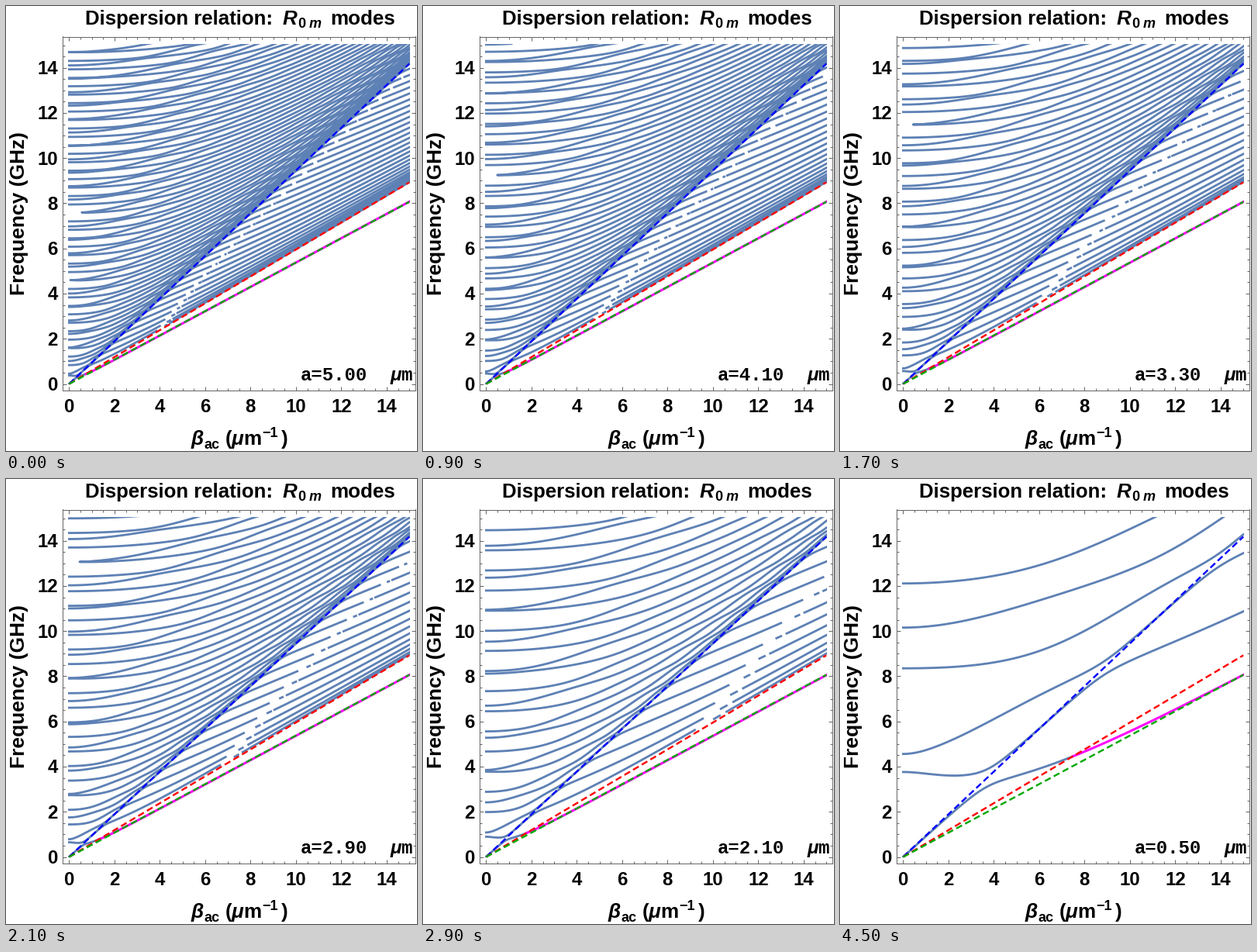
Animation, 530 px wide and 574 px high, one loop 4600 ms. Source, as a matplotlib script:

```python
import numpy as np
import matplotlib.pyplot as plt
from matplotlib.animation import FuncAnimation
from matplotlib.patches import Rectangle

W, H, DPI = 530, 574, 100
VL, VS, VR = 5.94, 3.74, 3.378      # bulk and surface wave speeds, km/s
TAU = 2 * np.pi
STEPS = 46
PX = 72 / DPI                       # points per pixel
LEFT, RIGHT, TOP, BOTTOM = 72.5, 528, 39.5, 495.5
X0, Y0, SX, SY = 81.4, 487.5, 29.25, 29.13   # origin and scale in pixels

# Bessel functions from their integral forms, tabulated once
theta = (np.arange(400) + 0.5) * np.pi / 400
xs = np.linspace(0, 135, 8101)
phase = np.outer(xs, np.sin(theta))
J0 = np.cos(phase).mean(axis=1)
J1 = np.cos(theta - phase).mean(axis=1)
decay = np.exp(np.outer(xs, np.cos(theta) - 1))
I_RATIO = (decay * np.cos(theta)).mean(axis=1) / decay.mean(axis=1)
del phase, decay


def j0(x):
    return np.interp(x, xs, J0)


def j1(x):
    return np.interp(x, xs, J1)


def i_ratio(x):
    return np.interp(x, xs, I_RATIO)


def pochhammer(k, f, a):
    """Axisymmetric rod equation, scaled so evanescent terms stay finite."""
    p2 = (TAU * f / VL) ** 2 - k ** 2
    q2 = (TAU * f / VS) ** 2 - k ** 2
    p, q = np.sqrt(np.abs(p2)), np.sqrt(np.abs(q2)) + 1e-9
    real_p, real_q = p2 > 0, q2 > 0
    a0 = np.where(real_p, j0(p * a), 1)
    a1 = np.where(real_p, p * j1(p * a), -p * i_ratio(p * a))
    b0 = np.where(real_q, j0(q * a), 1)
    b1 = np.where(real_q, j1(q * a), i_ratio(q * a)) / q
    value = (2 / a * (q2 + k ** 2) * a1 * b1
             - (q2 - k ** 2) ** 2 * a0 * b1 - 4 * k ** 2 * a1 * b0)
    return value, np.where(real_p, 0, p * a)


# Bulk grid follows the shear branches; surface grid lies below the shear line
K, Y = np.meshgrid(np.linspace(0, 15, 301), np.linspace(1e-3, 15.05, 600))
F = np.hypot(Y, VS * K / TAU)
KS, RATIO = np.meshgrid(np.linspace(0.03, 15, 200), np.linspace(0.85, 1, 80))
FS = RATIO * VS * KS / TAU

fig = plt.figure(figsize=(W / DPI, H / DPI), dpi=DPI, facecolor="white")
ax = fig.add_axes([LEFT / W, 1 - BOTTOM / H,
                   (RIGHT - LEFT) / W, (BOTTOM - TOP) / H])
ax.set_xlim((LEFT - X0) / SX, (RIGHT - X0) / SX)
ax.set_ylim((Y0 - BOTTOM) / SY, (Y0 - TOP) / SY)
ax.set_xticks(range(0, 15, 2))
ax.set_yticks(range(0, 15, 2))
ax.set_xticks(np.arange(0, 15.1, 0.5), minor=True)
ax.set_yticks(np.arange(0, 15.1, 0.5), minor=True)
for which, size in (("major", 5), ("minor", 3)):
    ax.tick_params(which=which, direction="in", length=size * PX,
                   width=PX, color="#666666", top=True, right=True,
                   labelbottom=False, labelleft=False)
for spine in ax.spines.values():
    spine.set(color="#666666", linewidth=PX)


def put(x, y, text, size=26, family="Liberation Sans", **kw):
    kw.setdefault("va", "baseline")
    return fig.text(x / W, 1 - y / H, text, fontsize=size * PX,
                    family=family, weight="bold", color="black", **kw)


put(101.5, 24, "Dispersion relation:", 25.8)
put(356.5, 24, "R", style="italic")
put(376, 28, "0", 18)
put(390.5, 28, "m", 18, style="italic")
put(418, 24, "modes")

for n in range(0, 15, 2):
    put(X0 + SX * n, 524, str(n), 24, ha="center")
    put(67, 496 - SY * n, str(n), 24, ha="right")
put(29, 268, "Frequency (GHz)", 26.4, rotation=90, ha="right", va="center")

put(239, 566, "β", style="italic")
put(256, 571, "ac", 18)
put(283, 566, "(")
put(291, 566, "μ", style="italic")
put(306, 566, "m")
put(330, 556, "−1", 18)
put(355, 566, ")")

MONO = "Liberation Mono"
radius = put(379.5, 483, "", 24, MONO)
put(495.5, 483, "μ", 24, MONO, style="italic")
put(509.5, 483, "m", 24, MONO)

ends = np.array([0, 15])
for speed, color in ((VL, "#0000ff"), (VS, "#ff0000"), (VR, "#00a800")):
    ax.plot(ends, speed * ends / TAU, color=color, lw=2.4 * PX,
            dashes=(3.5, 1.9), dash_capstyle="butt", zorder=5)

window = Rectangle((-0.04, 0), 15.08, 15.04, transform=ax.transData)
curves = []


def draw_zero(k, f, value, color, width, zorder):
    lines = ax.contour(k, f, value, levels=[0], colors=[color],
                       linewidths=width * PX, linestyles="solid",
                       zorder=zorder)
    lines.set_capstyle("projecting")
    lines.set_clip_path(window.get_path(), window.get_transform())
    curves.append(lines)


def update(i):
    while curves:
        curves.pop().remove()
    a = 5 - 0.1 * i
    radius.set_text(f"a={a:.2f}")
    value, depth = pochhammer(K, F, a)
    # the branches break up over a narrow band of evanescent depth
    gap = ((depth > 14.8) & (depth < 16.1)) | ((depth > 16.6) & (depth < 17))
    draw_zero(K, F, np.ma.masked_where(gap, value), "#5e81b5", 2.8, 3)
    draw_zero(KS, FS, pochhammer(KS, FS, a)[0], "#ff00ff", 3, 4)
    return curves


anim = FuncAnimation(fig, update, frames=STEPS, interval=100,
                     repeat=True, repeat_delay=0, blit=False)
plt.show()
```
